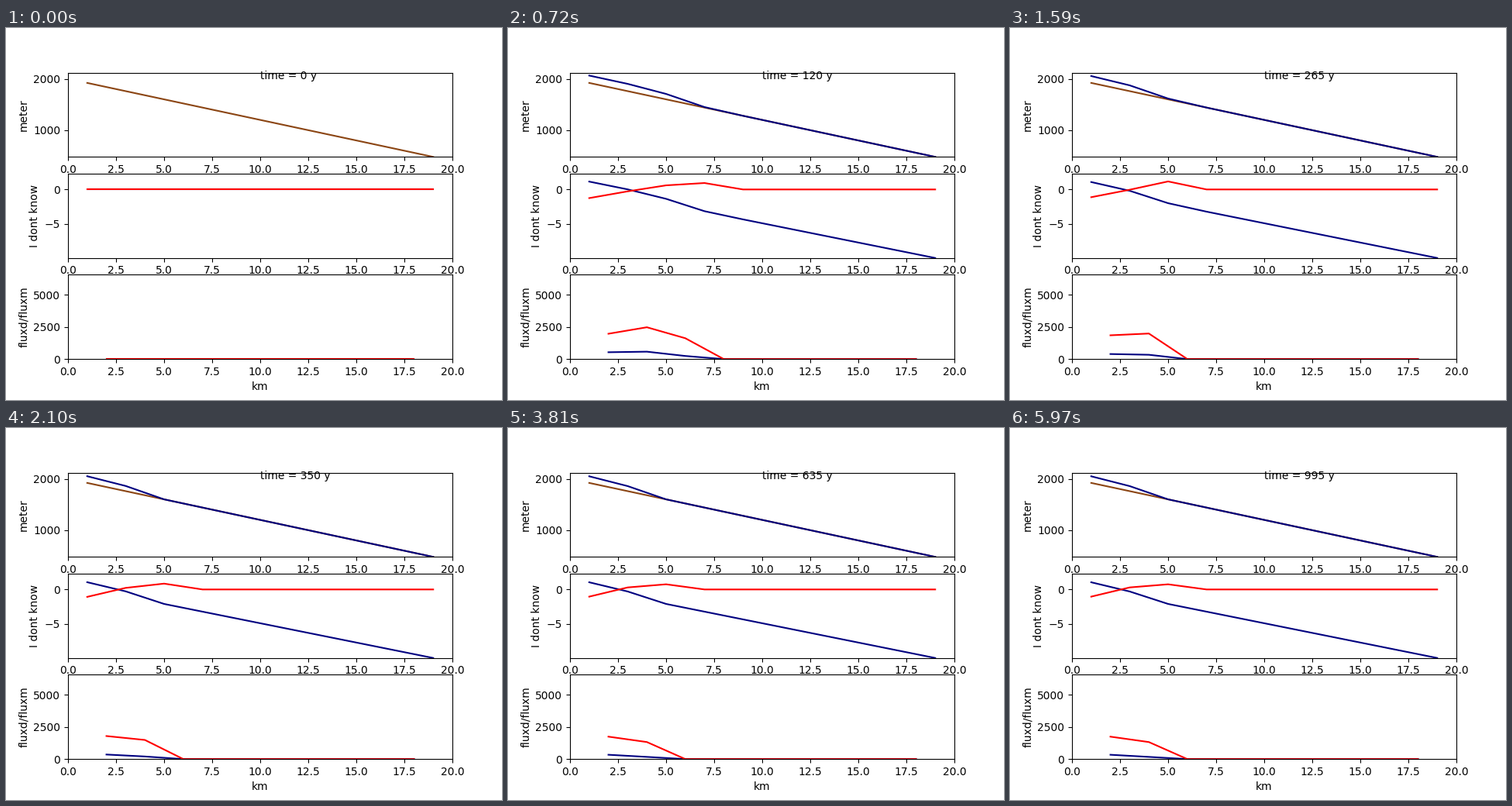
A matplotlib script for the animation above (6 s loop, 640 by 480 pixels).

```python
import numpy as np
import matplotlib.pyplot as plt
from matplotlib.animation import FuncAnimation

FRAMES, YEARS_PER_FRAME = 200, 5
SUBSTEPS = 10                      # solver steps per frame
DX = 2000.0                        # grid spacing in m
ELA, GRADIENT = 1900.0, 0.007      # equilibrium line, balance gradient
SLIDE = 5.7e-20 * (917 * 9.81) ** 3 * 3.1536e7
DEFORM = 0.4 * 1.9e-24 / 5.7e-20 * SLIDE

x = np.arange(1, 20, 2.0)
x_face = (x[1:] + x[:-1]) / 2
bed = 2000 - 80 * x


def mean(a):
    return (a[1:] + a[:-1]) / 2


def fluxes(H):
    slope = -np.diff(bed + H) / DX
    return DEFORM * mean(H ** 5) * slope ** 3, SLIDE * mean(H ** 3) * slope ** 3


def rates(H):
    """Mass balance, flux convergence and both fluxes for thickness H."""
    fd, fm = fluxes(H)
    q = np.concatenate(([0], fd + fm, [0]))
    return GRADIENT * (bed + H - ELA), -np.diff(q) / DX, fd, fm


def simulate():
    H = np.full(x.size, 200.0)
    dt = YEARS_PER_FRAME / SUBSTEPS
    history = [H]
    for _ in range(FRAMES - 1):
        for _ in range(SUBSTEPS):
            balance, conv, _, _ = rates(H)
            H = np.maximum(H + dt * (balance + conv), 0)
        history.append(H)
    return history


history = simulate()

fig, (ax1, ax2, ax3) = plt.subplots(3, 1, figsize=(6.4, 4.8), dpi=100)
panels = (
    (ax1, "meter", (480, 2120), (1000, 2000)),
    (ax2, "I dont know", (-9.94, 2.28), (-5, 0)),
    (ax3, "fluxd/fluxm", (0, 6564), (0, 2500, 5000)),
)
for ax, label, ylim, yticks in panels:
    ax.set_xticks(np.arange(0, 20.1, 2.5))
    ax.set_yticks(yticks)
    ax.set_xlim(0, 20)
    ax.set_ylim(*ylim)
    ax.set_ylabel(label)
ax3.set_xlabel("km")

ax1.plot(x, bed, color="saddlebrown")
surface, = ax1.plot(x, 0 * x, color="navy")
balance_line, = ax2.plot(x, 0 * x, color="navy")
conv_line, = ax2.plot(x, 0 * x, color="red")
fd_line, = ax3.plot(x_face, 0 * x_face, color="navy")
fm_line, = ax3.plot(x_face, 0 * x_face, color="red")
clock = ax1.text(10, 2000, "time = 0 y")
lines = (surface, balance_line, conv_line, fd_line, fm_line)


def update(i):
    if i == 0:                     # nothing computed yet: all series are zero
        values = [np.zeros(x.size)] * 3 + [np.zeros(x_face.size)] * 2
    else:
        values = (bed + history[i], *rates(history[i]))
    for line, v in zip(lines, values):
        line.set_ydata(v)
    clock.set_text(f"time = {i * YEARS_PER_FRAME} y")
    return (*lines, clock)


anim = FuncAnimation(fig, update, frames=FRAMES, interval=30,
                     repeat=True, repeat_delay=0)
plt.show()
```
